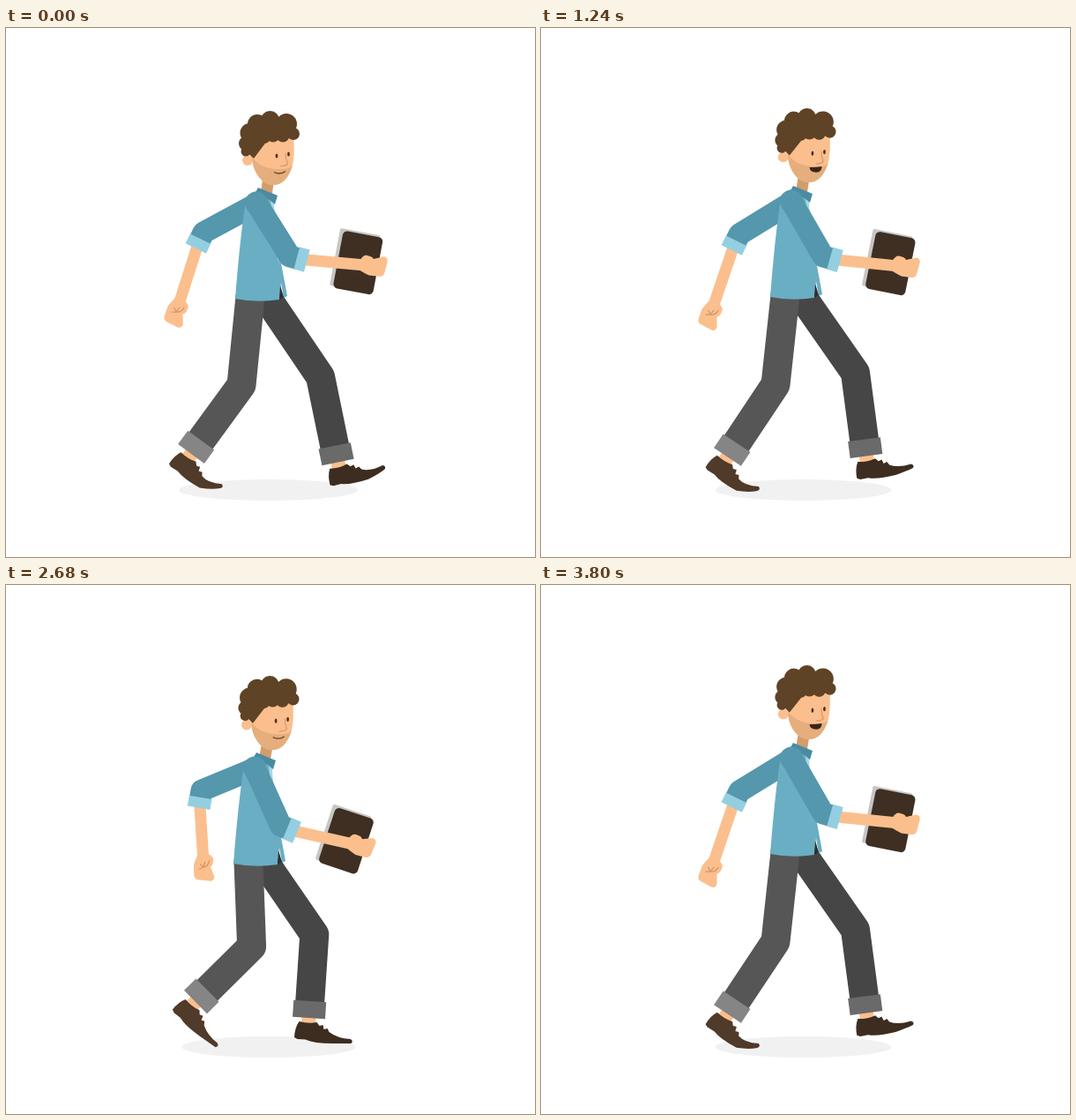
Write an HTML page with a canvas that moves like this. It is 600 px wide and 600 px high and loops after 3840 ms.

```html
<!DOCTYPE html>
<html lang="en">
<head>
<meta charset="utf-8">
<title>Walking man</title>
<style>
html, body { margin: 0; width: 100%; height: 100%; overflow: hidden; background: #fff; }
canvas { display: block; width: 600px; height: 600px; }
</style>
</head>
<body>
<canvas id="stage" width="600" height="600"></canvas>
<script>
const ctx = document.getElementById('stage').getContext('2d');
const CYCLE = 1280, STEP = 640, TICK = 40;
const SKIN = '#fbbf8e', HAIR = '#5e4326', SHIRT = '#6aaec4', SLEEVE = '#5597ac', CUFF = '#94cfe1';

// Each row starts with its time in the cycle.
// body: x, collar y
const BODY = [[0, 286, 181], [120, 284, 190], [200, 284, 191.5], [400, 284, 171], [510, 285.5, 166],
  [600, 286, 175], [760, 285, 188.5], [840, 284, 191], [1040, 284.5, 172], [1150, 285.5, 168], [1240, 286, 179]];
// head: dx, dy, tilt
const HEAD = [[0, 0, 0, 0], [120, -1, 9, 1], [200, 0, 13, 4], [400, 2.5, -4.5, 10], [510, 4, -10, 8],
  [600, 5, -3, 5], [760, 4.5, 9.5, 4], [840, 4.4, 13.7, 4], [1040, 3, -4, 6], [1160, 1.5, -12.5, 3], [1240, .8, -3, 1.5]];
// legs: knee x y, ankle x y, foot turn, toe lift
const NEAR_LEG = [[0, 267, 405, 210, 483, 29, 11], [120, 278.6, 410, 215, 473, 35, 0], [200, 289, 407, 229, 457, 46, 0],
  [400, 322, 373.5, 281.5, 448.5, 24, 0], [600, 332, 381, 352.5, 485.5, -19, 5], [640, 332.5, 386, 360, 492, -19, 5],
  [760, 328, 396, 330, 492, 0, 0], [840, 321, 400, 310.5, 493, 1, 0], [1040, 293, 402, 262, 489, 13, 7],
  [1240, 266, 404.5, 211.5, 486.5, 28, 11]];
const FAR_LEG = [[0, 356.5, 395.4, 376.5, 492.5, -18, 5], [120, 349.8, 396.4, 343.5, 491, 0, 0], [200, 339, 398, 322, 491.5, 1, 0],
  [400, 306, 402, 267, 484.5, 16, 8], [600, 276, 402.5, 212.5, 475, 29, 6], [640, 278, 404, 211.5, 472.5, 31, 4],
  [760, 291, 408.5, 217, 462, 43, 0], [840, 302.5, 410, 229, 454.5, 53, 0], [1040, 341, 381, 286, 450, 25, 0],
  [1240, 356.5, 391, 369, 485.5, -14, 3]];
// arms: elbow x y, hand x y
const NEAR_ARM = [[0, 322, 259, 416, 270], [120, 311.5, 273, 402, 296], [200, 291, 280, 366, 319], [400, 250, 255, 266, 342],
  [600, 226, 236, 211, 325], [640, 225, 238, 210.5, 324], [760, 224, 246, 240, 321], [840, 231, 249, 277, 320],
  [1040, 283, 262, 358, 307], [1240, 320, 259, 413, 271]];
const FAR_ARM = [[0, 224, 232, 193, 322], [120, 222, 233, 224, 320], [200, 231, 245, 264, 323], [400, 283, 262, 357, 309],
  [600, 314, 260, 405, 270], [640, 317, 262, 408, 271], [760, 307, 275, 396, 296], [840, 285, 281, 358, 320],
  [1040, 250, 255, 266, 338], [1240, 225, 234, 192, 325]];
// ground shadow: half width
const SHADOW = [[0, 101.5], [120, 98.5], [200, 93.5], [320, 84.5], [400, 84], [520, 93.5], [600, 100]];

// Smooth periodic curve through the rows of a table
function pose(keys, time, period = CYCLE) {
  const n = keys.length, t = time % period;
  const row = i => keys[(i + n) % n];
  const at = i => row(i)[0] + period * Math.floor(i / n);
  let i = n - 1;
  while (at(i) > t) i--;
  const h = at(i + 1) - at(i), u = (t - at(i)) / h;
  const slope = (k, c) => {
    const h0 = at(k) - at(k - 1), h1 = at(k + 1) - at(k);
    const d0 = (row(k)[c] - row(k - 1)[c]) / h0, d1 = (row(k + 1)[c] - row(k)[c]) / h1;
    return (d0 * h1 + d1 * h0) / (h0 + h1);
  };
  return row(i).slice(1).map((a, j) => {
    const c = j + 1, b = row(i + 1)[c], m = slope(i, c) * h, k = slope(i + 1, c) * h;
    return a + u * (m + u * (3 * (b - a) - 2 * m - k + u * (2 * (a - b) + m + k)));
  });
}

const polar = (x, y, angle, r) => [x + r * Math.cos(angle), y + r * Math.sin(angle)];
const rad = deg => deg * Math.PI / 180;

function shape(d, color) {
  ctx.fillStyle = color;
  ctx.fill(new Path2D(d));
}
function stroke(d, color, width) {
  ctx.strokeStyle = color;
  ctx.lineWidth = width;
  ctx.stroke(new Path2D(d));
}
function line(points, width, color) {
  ctx.strokeStyle = color;
  ctx.lineWidth = width;
  ctx.lineJoin = 'round';
  ctx.beginPath();
  points.forEach(p => ctx.lineTo(...p));
  ctx.stroke();
}
function oval(x, y, rx, ry, color) {
  ctx.fillStyle = color;
  ctx.beginPath();
  ctx.ellipse(x, y, rx, ry, 0, 0, 7);
  ctx.fill();
}
function box(x, y, w, h, r, color) {
  ctx.fillStyle = color;
  ctx.beginPath();
  ctx.roundRect(x, y, w, h, r);
  ctx.fill();
}
function place(x, y, angle, draw) {
  ctx.save();
  ctx.translate(x, y);
  ctx.rotate(angle);
  draw();
  ctx.restore();
}

function shoe(lift, color) {
  const y = 27 - lift;
  shape(`M-11 4Q-16 11 -16.5 22L-13 24L-4 24.5Q6 29 27 29Q40 ${29 - lift * .4} 48 ${y + 2}Q51 ${y - 1} 47 ${y - 3}
    Q32 ${23 - lift * .3} 23 16L21 12L17 13L16 8L12 9L9 5Q0 7 -11 4Z`, color);
}

function leg(hip, [kx, ky, ax, ay, turn, lift], cloth, hem, leather) {
  const shin = Math.atan2(ay - ky, ax - kx), ankle = [ax, ay];
  line([polar(ax, ay, shin, -4), polar(ax, ay, shin, 9)], 16, SKIN);
  place(ax, ay, rad(turn), () => shoe(lift, leather));
  oval(...hip, 16.5, 16.5, cloth);
  line([hip, [kx, ky], polar(ax, ay, shin, -10)], 33, cloth);
  line([polar(ax, ay, shin, -19), ankle], 37, hem);
}

function book() {
  place(-17, -1.7, rad(4), () => {
    box(-27, -35, 46, 66, 2, '#c6c6c4');
    box(-23, -33, 46, 66, 5, '#3e2f22');
  });
}

function hand(creased) {
  shape('M-15 -5Q-12 -13 -6 -11Q-2 -11 0 -8L11 -12Q16 -12 16 -7L14 7Q13 11 8 11L-3 11Q-9 9 -15 6Z', SKIN);
  if (creased) stroke('M-8 -7Q-1 -6 0 0L-4 4M-6 -2L0 0L2 5', '#cf9766', 1.2);
}

function arm(shoulder, [ex, ey, hx, hy], near) {
  const fore = Math.atan2(hy - ey, hx - ex);
  const upper = Math.atan2(ey - shoulder[1], ex - shoulder[0]);
  const bend = fore + .16 * Math.atan2(Math.sin(upper - fore), Math.cos(upper - fore));
  if (near) place(hx, hy, fore, book);
  line([polar(ex, ey, bend, 14), polar(hx, hy, fore, -9)], 13, SKIN);
  place(hx, hy, fore, () => hand(!near));
  oval(...shoulder, 13, 13, SLEEVE);
  line([shoulder, [ex, ey], polar(ex, ey, bend, 9)], 25, SLEEVE);
  line([polar(ex, ey, bend, 8), polar(ex, ey, bend, 20)], 26, CUFF);
}

function torso() {
  shape('M-13 14Q-20 60 -25 126Q0 131 25 127L27 108L30 125L34 123Q26 84 21 45L17 12L0 4Z', SHIRT);
  shape('M25 127L26 111L30 124Z', '#2f2f2f');
  shape('M15 13L19 17Q20 50 25 90Q17 50 15 13Z', '#a5d8e6');
  shape('M1 0L23 9L20 19L14 14L-3 7Z', '#4a8ba1');
}

function head(talking, blinking) {
  oval(-26, 0, 6, 6, SKIN);
  shape('M-19 -30L26 -28Q28 -2 24 8Q18 28 3 28Q-12 27 -19 8Q-22 0 -21 -10Z', SKIN);
  shape('M-21 -3Q-14 5 -5 8Q10 13 25 6Q18 28 3 28Q-12 27 -19 8Z', '#e5ae7c');
  shape('M-5 7Q10 0 25 2Q25 8 20 9Q5 12 -5 7Z', SKIN);
  stroke('M17 -8Q17 -2 19.5 4Q17 7 11 6.5', '#d99a68', 1.2);
  if (blinking) {
    stroke('M5 -6.5L10 -6.5M18.5 -8L24 -8', '#4a321d', 1.4);
  } else {
    oval(7, -5, 1.4, 2.6, '#4a321d');
    oval(20.5, -7, 1.4, 2.6, '#4a321d');
  }
  if (talking) shape('M4 11Q11 11 18 9.5Q18 16 12 16.5Q5 17 4 11Z', '#3a2617');
  else stroke('M4 13.5Q11 17 17 12.5', '#6b4526', 1.3);
  // curls
  shape('M-30 -12L-28 -32L-10 -46L20 -44L26 -26L-4 -22L-13 -10L-19 -2Z', HAIR);
  for (const [x, y, r] of [[-15, -41, 11], [-.5, -45.5, 10.5], [18, -41, 12], [26, -30, 7], [-23.5, -31, 11],
    [-28, -19, 8], [-28, -10, 5.5], [-16, -19, 6], [-7, -26, 7], [3, -28, 7.5], [14, -28, 7.5]]) oval(x, y, r, r, HAIR);
}

function draw(time) {
  const t = time % CYCLE;
  const [bx, by] = pose(BODY, t), [dx, dy, tilt] = pose(HEAD, t);
  const x = bx - 1;
  ctx.fillStyle = '#fff';
  ctx.fillRect(0, 0, 600, 600);
  oval(297.7, 524, pose(SHADOW, t, STEP)[0], 12, '#f1f1f1');
  arm([x + 2, by + 17], pose(FAR_ARM, t), false);
  leg([x + 17, by + 134], pose(FAR_LEG, t), '#464646', '#6a6a6a', '#3d2d20');
  leg([x - 8, by + 124], pose(NEAR_LEG, t), '#565656', '#858585', '#503a2a');
  line([[298 + dx, 168 + dy], [x + 10, by + 10]], 13, '#d39c6d');
  place(x, by, 0, torso);
  place(300 + dx, 150 + dy, rad(tilt), () => head(t >= 240, t >= 360 && t < 480));
  arm([x - 1, by + 17.5], pose(NEAR_ARM, t), true);
}

const start = performance.now();
function tick() {
  const elapsed = Math.max(0, performance.now() - start);
  draw(Math.floor(elapsed / TICK) * TICK);
  requestAnimationFrame(tick);
}
tick();
</script>
</body>
</html>
```
